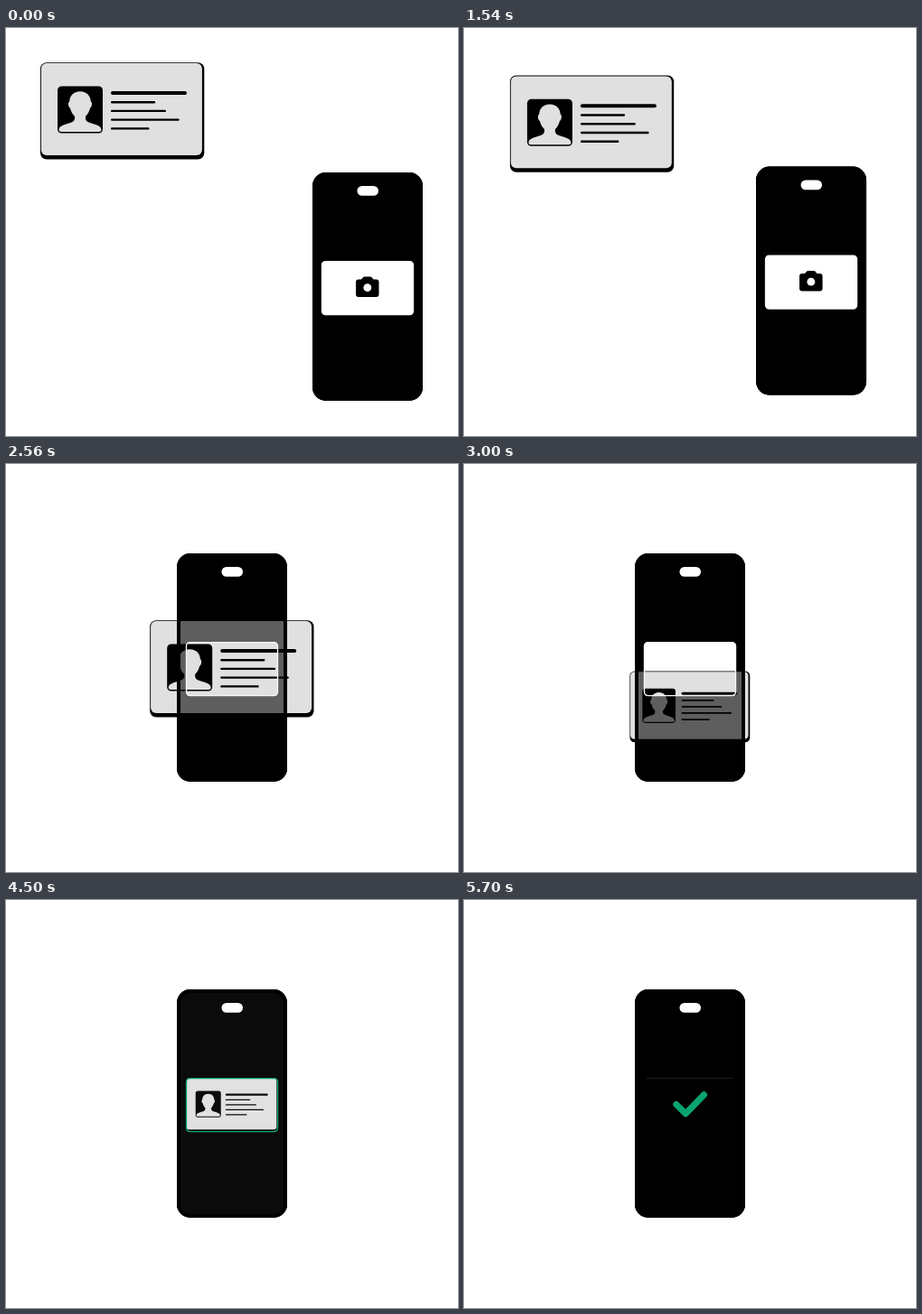
Write an HTML page that moves like this. It is 500 px wide and 452 px high and loops after 8.12 s.

```html
<!DOCTYPE html>
<html lang="en">
<head>
<meta charset="utf-8">
<title>Card scan</title>
<style>
  html, body { margin: 0; width: 100%; height: 100%; overflow: hidden; background: #fff; }
  svg { display: block; width: 100%; height: 100%; }
</style>
</head>
<body>
<svg viewBox="0 0 500 452">
  <g id="base">
    <rect width="122" height="253" rx="15"/>
    <rect x="10.5" y="98.5" width="101" height="59" rx="4" fill="#fff"/>
  </g>

  <g id="card">
    <rect width="181.3" height="107.3" rx="7"/>
    <rect x=".9" y=".9" width="178" height="101.8" rx="6" fill="#e0e0e0"/>
    <rect x="19" y="26.3" width="50" height="52" rx="4.5"/>
    <path fill="#e0e0e0" d="M44 32C51.5 32 55.5 37 55.7 43C57.8 44 57.2 49.5 55 50.5C54 55 52 57.5 50 59.5C49.5 63 50.5 65 53.5 66.3C59 68.5 67.3 69.5 67.5 74.5Q67.5 76.8 65 76.8H23Q20.5 76.8 20.5 74.5C20.7 69.5 29 68.5 34.5 66.3C37.5 65 38.5 63 38 59.5C36 57.5 34 55 33 50.5C30.8 49.5 30.2 44 32.3 43C32.5 37 36.5 32 44 32Z"/>
    <g stroke="#000" stroke-linecap="round" stroke-width="2.4">
      <path d="M80 33.7H160" stroke-width="4"/>
      <path d="M79.2 44H126M79.2 53.7H137.8M79.2 63.4H152.5M79.2 73.2H119.3"/>
    </g>
  </g>

  <g id="front">
    <path fill-opacity=".58" fill-rule="evenodd" d="M15 0H107A15 15 0 0 1 122 15V238A15 15 0 0 1 107 253H15A15 15 0 0 1 0 238V15A15 15 0 0 1 15 0ZM14.5 98.5H107.5A4 4 0 0 1 111.5 102.5V153.5A4 4 0 0 1 107.5 157.5H14.5A4 4 0 0 1 10.5 153.5V102.5A4 4 0 0 1 14.5 98.5Z"/>
    <g id="camera">
      <path d="M51 118.5H54L56 116.2Q56.6 115.5 57.5 115.5H64Q65 115.5 65.6 116.2L67.5 118.5H70.5Q73.5 118.5 73.5 121.5V135Q73.5 138 70.5 138H51Q48 138 48 135V121.5Q48 118.5 51 118.5Z"/>
      <circle cx="60.8" cy="127.7" r="4.4" fill="#fff"/>
    </g>
    <rect id="screen" x="2" y="2" width="118" height="249" rx="13"/>
    <rect x="2" y="2" width="118" height="249" rx="13" fill="none" stroke="#000" stroke-width="4"/>
    <rect x="49.5" y="15" width="23.5" height="10.8" rx="5.4" fill="#fff"/>
    <path id="trace" d="M13 98.5H109" stroke="#1c1c1c"/>
    <rect id="finder" x="10.5" y="98.6" width="101" height="59" rx="4" fill="none" stroke-width="1.4"/>
    <path id="tick" d="M45.8 127.5L56.2 137.8L76.5 116.7" fill="none" stroke="#09a571" stroke-width="7" stroke-linecap="round" stroke-linejoin="round"/>
  </g>
</svg>

<script>
const LOOP = 8120;
const CARD_W = 181.3, CARD_H = 107.3;
const FULL = 1, SMALL = 0.468, FIT = 0.56;
const DIP = 42;
const WHITE = [246, 246, 246], GREEN = [9, 165, 113];
const LIGHT = [224, 224, 224], BLACK = [0, 0, 0];

const el = id => document.getElementById(id);
const [base, card, front, camera, screen, trace, finder, tick] =
  ["base", "card", "front", "camera", "screen", "trace", "finder", "tick"].map(el);

const linear = (t, a, b) => Math.min(1, Math.max(0, (t - a) / (b - a)));
const easeIn = (t, a, b) => linear(t, a, b) ** 3;
const mix = (a, b, p) => a + (b - a) * p;
const mixColor = (a, b, p) => `rgb(${a.map((v, i) => Math.round(mix(v, b[i], p)))})`;
const set = (node, name, value) => node.setAttribute(name, value);

function draw(t) {
  const meet = easeIn(t, 1200, 1920);
  const shrink = easeIn(t, 2540, 3120);
  const grow = easeIn(t, 3240, 3900);
  const detect = easeIn(t, 4020, 4260);
  const flash = easeIn(t, 4400, 4680);
  const darken = easeIn(t, 4820, 5100);
  const done = linear(t, 5480, 5700);

  const phone = `translate(${mix(339, 189, meet)} ${mix(160, 99, meet)})`;
  set(base, "transform", phone);
  set(front, "transform", phone);

  // The card dips while it backs away, then fills the finder.
  const scale = mix(mix(FULL, SMALL, shrink), FIT, grow);
  const cx = mix(38, 159.2, meet) + CARD_W / 2;
  const cy = mix(38.2, 173.2, meet) + CARD_H / 2 + DIP * 4 * shrink * (1 - shrink);
  set(card, "transform",
    `translate(${cx} ${cy}) scale(${scale}) translate(${-CARD_W / 2} ${-CARD_H / 2})`);

  set(camera, "opacity", 1 - linear(t, 1560, 1740));
  set(screen, "fill", mixColor(LIGHT, BLACK, darken));
  set(screen, "opacity", flash);
  set(finder, "stroke", mixColor(WHITE, GREEN, detect));
  set(finder, "opacity", 1 - done);
  set(trace, "opacity", done);
  set(tick, "opacity", done);
}

const start = performance.now();
function tickFrame() {
  draw((performance.now() - start) % LOOP);
  requestAnimationFrame(tickFrame);
}
tickFrame();
</script>
</body>
</html>
```
